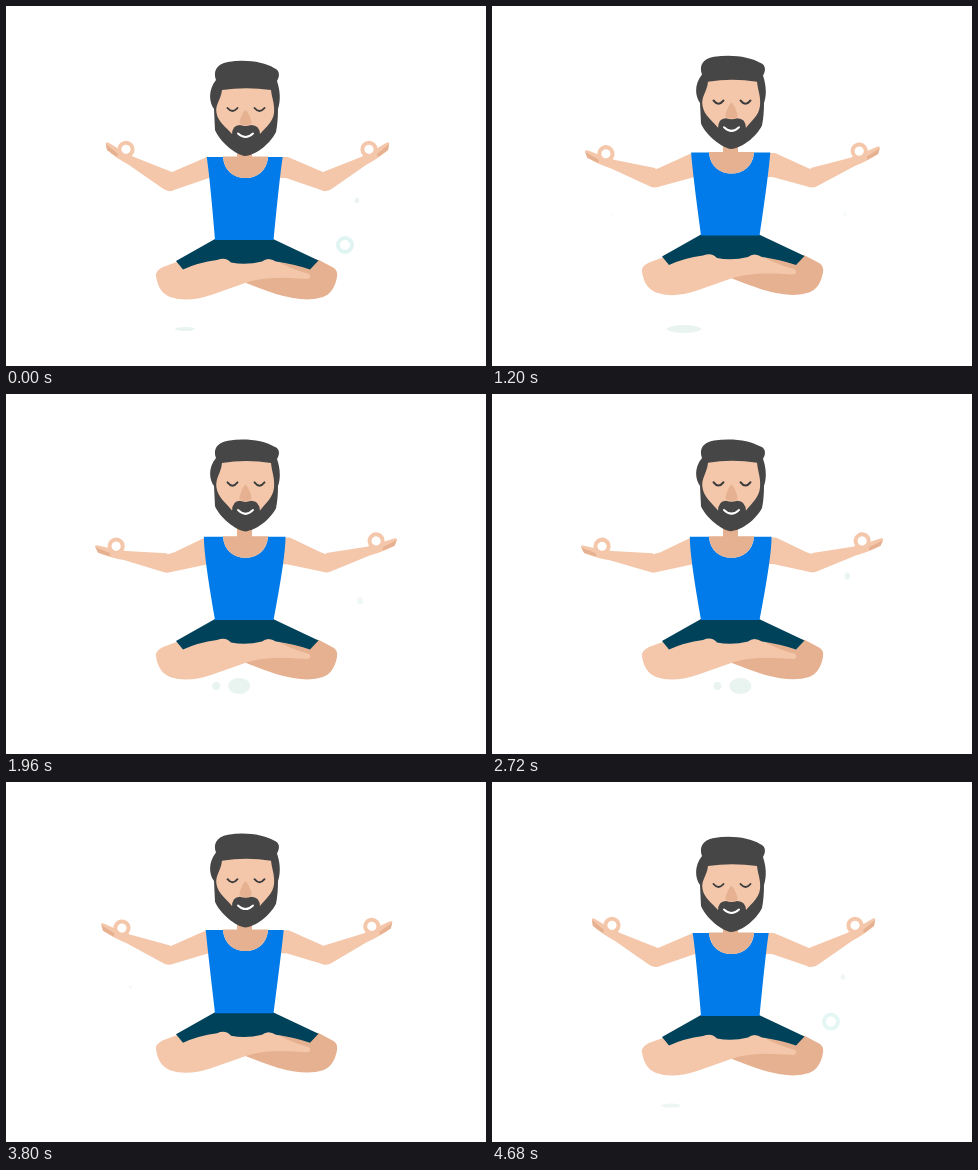
Write an HTML page that moves like this. It is 480 px wide and 360 px high and loops after 4720 ms.

```html
<!DOCTYPE html>
<html lang="en">
<head>
<meta charset="utf-8">
<title>Meditation</title>
<style>
  html, body { margin: 0; width: 100%; height: 100%; overflow: hidden; background: #fff; }
  svg { display: block; width: 100%; height: 100%; }
</style>
</head>
<body>
<svg id="stage" viewBox="0 0 480 360"></svg>
<script>
const LOOP = 4720, STEP = 40;
const SKIN = '#f4c7ab', SHADE = '#e6b190', HAIR = '#464646', BLUE = '#007be9', NAVY = '#00425a', MIST = '#e9f4f1';
const stage = document.getElementById('stage');

function add(tag, attrs, parent = stage) {
  const el = document.createElementNS('http://www.w3.org/2000/svg', tag);
  for (const k in attrs) el.setAttribute(k, attrs[k]);
  parent.appendChild(el);
  return el;
}
const path = (fill, d, parent) => add('path', { fill, d }, parent);

// Moves an element up by `rise` while stretching it vertically around y = `mid`
function lift(el, rise, stretch = 1, mid = 0) {
  el.setAttribute('transform', `translate(0 ${mid - rise}) scale(1 ${stretch}) translate(0 ${-mid})`);
}

// Faint spots that glow briefly: a ring, a puddle, drops below and seeded bubbles at the sides
let seed = 11;
const random = () => (seed = seed * 16807 % 2147483647) / 2147483647;
const spots = [];
function spot(at, cx, cy, rx, ry, look = { fill: MIST }) {
  spots.push({ at, el: add('ellipse', { cx, cy, rx, ry, ...look }) });
}
spot(0, 339, 239, 7, 7, { fill: 'none', stroke: '#e0f5f2', 'stroke-width': 4 });
spot(0, 179, 323, 10, 2);
spot(1200, 192, 323, 17, 4);
for (const at of [1960, 2720]) {
  spot(at, at / 50 + 194, 292, 11, 8);
  spot(at, at / 50 + 171, 292, 4, 4);
}
for (let i = 0; i < 14; i++) {
  const x = i % 2 ? 115 + 18 * random() : 351 + 14 * random();
  const r = 1.2 + 2 * random();
  spot(LOOP * i / 14, x, 182 + 40 * random(), r, r * 1.3);
}

// Arms: the forearm and hand turn as one piece around the elbow
function arm(turn, transform) {
  const g = add('g', { transform, fill: SKIN });
  const upper = add('path', {}, g);
  const fore = add('g', {}, g);
  path(SKIN, 'M100,139 Q99,135 103,137 L113,143 L128,151 L166,166 L168,184 Q162,187 156,182 L123,159 Q110,152 101,144 Z', fore);
  path(SHADE, 'M100,138 L112,148 L111,151 L101,144 Z', fore);
  add('circle', { cx: 120, cy: 143.3, r: 6.6, fill: '#fff', stroke: SKIN, 'stroke-width': 4 }, fore);
  return p => {
    const y = -8 * p;
    upper.setAttribute('d', `M214,${151 + y} L${201 - 2 * p},${151 + y} L${166 + 2 * p},${166 + y}
      L${166 - turn * p / 3.4},${166.5 - 6.5 * p} L158,${180 + y} L165,${185 - 7.5 * p} L${203 - p},${172 - 2 * p} H214 Z`);
    fore.setAttribute('transform', `translate(${p} ${-7.5 * p}) rotate(${-turn * p} 164 185)`);
  };
}
const arms = [arm(19.5, ''), arm(13.5, 'translate(483 0) scale(-1 1)')];

const hips = add('g', {});
path(SHADE, 'M240,262 L300,252 L313,254 L328,262 Q332,265 331,271 Q328,287 317,291 Q300,297 270,288 Q255,283 240,277 Z', hips);
path(SKIN, 'M176,254 L157,261 Q149,265 150,270 Q152,286 164,291 Q181,297 205,289 L242,276 Q260,271 283,272 L302,273 Q306,271 303,268 Q282,262 269,254 L255,248 H215 Z', hips);
path(NAVY, 'M209,233 H267 L312.5,254.5 L304,263.5 Q288,258 270,255.5 Q262,250.5 256,255.5 Q240,259.5 225,256.5 Q220,250.5 211,254 Q192,256.5 177,263.5 L170,255 Z', hips);

const shirt = path(BLUE, '');
const neck = path(SHADE, 'M231,130 H246 V150.5 H262 C261,165 251,172 239.5,172 C228,172 218,165 217,150.5 H231 Z');

const head = path(HAIR, 'M210,74 C207,66 210,58 222,56 C240,53 258,56 268,62 C274,64 274,70 271,75 C274,84 275,94 272,103 Q272,116 270,126 C264,138 250,149 239,150 C230,149 214,136 209,124 L208,103 C203,96 202,84 210,74 Z');

const face = add('g', { fill: 'none', 'stroke-linecap': 'round' });
path(SKIN, 'M216,84 Q240,80.5 265,84 C266,93 269,98 268,107 C267,116 260,121 254,128 H226 C220,121 212,116 210.5,107 C209,98 215,94 216,84 Z', face);
path(SHADE, 'M239.5,104 C241,104 246,114 245.5,117 C244,120 235,120 233.5,117 C233,114 238,104 239.5,104 Z', face);
path(HAIR, 'M226,129 Q226,119 234,119 Q239.5,121 245,119 Q254,119 254,129 Z', face);
function curve(x, y, width, dip, stroke) {
  add('path', { d: `M${x},${y} q${width / 2},${dip} ${width},0`, stroke, 'stroke-width': 1.9 }, face);
}
curve(221.5, 102, 10, 6, '#3b3b3b');
curve(248.5, 102, 10, 6, '#3b3b3b');
curve(232, 127.5, 15, 7, '#fff');

function draw(time) {
  const t = Math.floor((time % LOOP) / STEP) * STEP;
  const p = (1 - Math.cos(2 * Math.PI * t / LOOP)) / 2; // breath: 0 low, 1 high
  for (const pose of arms) pose(p);
  lift(hips, 8.6 * p);
  lift(neck, 8.8 * p);
  lift(head, 10 * p, 1 - 0.037 * p, 55);
  lift(face, 14.5 * p, 1 + 0.09 * p, 103);

  const top = 151 - 8.8 * p, waist = 234 - 8.6 * p, wide = 38 + 3 * p, bend = 35 + 6.5 * p, mid = 238.7;
  shirt.setAttribute('d', `M${mid - wide},${top} H217 C218,${top + 14} 228,${top + 21} 239.5,${top + 21}
    C251,${top + 21} 261,${top + 14} 262,${top} H${mid + wide}
    Q${mid + bend},${top + 19} 267.5,${waist} H209 Q${mid - bend},${top + 19} ${mid - wide},${top} Z`);

  for (const { el, at } of spots) {
    const away = (t - at + LOOP * 1.5) % LOOP - LOOP / 2;
    el.setAttribute('opacity', Math.max(0, 1 - Math.abs(away) / 240));
    lift(el, away * 0.015);
  }
}

const start = performance.now();
function tick() {
  draw(performance.now() - start);
  requestAnimationFrame(tick);
}
tick();
</script>
</body>
</html>
```
